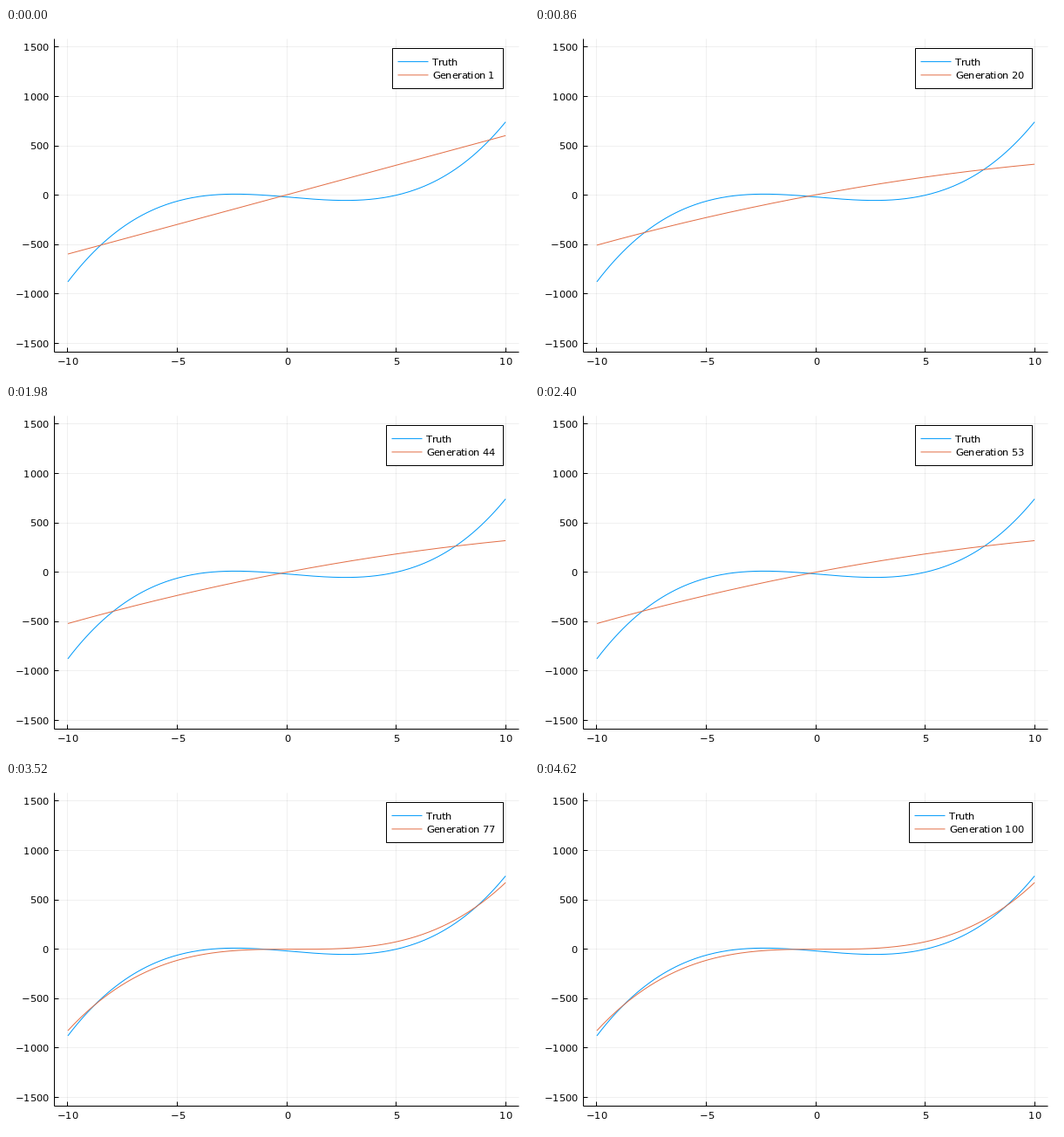
These frames come from a looping animation (600 px wide and 400 px high, 4.64 s). A matplotlib script:

```python
import math

import numpy as np
import matplotlib.pyplot as plt
from matplotlib.animation import FuncAnimation
from matplotlib.patches import Rectangle
from matplotlib.textpath import TextPath

W, H, DPI = 600, 400, 100
TICK_MS, LOOP_MS = 20, 4640
PX = 72 / DPI  # one pixel in points
EM = 11.5      # font size in pixels

LEFT, RIGHT, TOP, BOTTOM = 55.9, 588.2, 11.8, 371.5
X_MAX, Y_MAX = 10.6, 1590
BLUE, ORANGE = "#009afa", "#e36f47"

plt.rcParams["font.family"] = "DejaVu Sans"

fig = plt.figure(figsize=(W / DPI, H / DPI), dpi=DPI, facecolor="white")
ax = fig.add_axes([0, 0, 1, 1])
ax.set_xlim(0, W)
ax.set_ylim(H, 0)
ax.axis("off")


def px(x):
    return LEFT + (x + X_MAX) / (2 * X_MAX) * (RIGHT - LEFT)


def py(y):
    return BOTTOM - (y + Y_MAX) / (2 * Y_MAX) * (BOTTOM - TOP)


def line(xs, ys, color="black", z=3, **kw):
    return ax.plot(xs, ys, color=color, lw=PX, zorder=z,
                   solid_capstyle="butt", **kw)[0]


def ink_width(text):
    return TextPath((0, 0), text, size=EM).get_extents().width


def advance(char):
    """Whole-pixel pen advance of one character."""
    return math.floor(ink_width(f"|{char}|") - ink_width("||"))


ADVANCE = {c: advance(c) for c in set("TruthGeneration 0123456789\u2212")}


def text_width(text):
    return sum(ADVANCE[c] for c in text)


def make_glyphs(count, z=3):
    return [ax.text(0, 0, "", fontsize=EM * PX, va="baseline", zorder=z)
            for _ in range(count)]


def place(glyphs, pen, y, text):
    """Set text on whole pixels; unused glyphs stay empty."""
    for glyph, char in zip(glyphs, text.ljust(len(glyphs))):
        glyph.set_text(char.strip())
        glyph.set_position((pen, y))
        pen += ADVANCE[char]


def label(pen, y, text, z=3):
    glyphs = make_glyphs(len(text), z)
    place(glyphs, round(pen), round(y), text)
    return glyphs


def number(n):
    return str(n).replace("-", "\u2212")


# Grid, ticks and axes, all on whole pixels
x_axis, y_axis = math.floor(BOTTOM), math.floor(LEFT)
for v in range(-10, 11, 5):
    x, text = math.floor(px(v)), number(v)
    line([x, x], [TOP, BOTTOM], z=1, alpha=0.06)
    line([x, x], [x_axis, x_axis - 5])
    label(px(v) - text_width(text) / 2, 386, text)
for v in range(-1500, 1501, 500):
    y, text = math.floor(py(v)), number(v)
    line([LEFT, RIGHT], [y, y], z=1, alpha=0.06)
    line([y_axis, y_axis + 5], [y, y])
    label(48 - text_width(text), py(v) + 4.2, text)
line([y_axis, RIGHT], [x_axis, x_axis])
line([y_axis, y_axis], [TOP, x_axis])

# Curves, with polynomial coefficients from the highest power down
xs = np.linspace(-10, 10, 201)
TRUTH = [1, -0.5, -19, -17.5]
FITS = [  # (first generation, coefficients)
    (1, [60, 4]),
    (7, [49, -9]),
    (18, [-1, 41, 4]),
    (33, [-1, 42, 0]),
    (54, [0.75, -0.75, 0, 0]),
]

line(px(xs), py(np.polyval(TRUTH, xs)), BLUE)
fit = line(px(xs), py(0 * xs), ORANGE, z=4)

# Legend, which grows to the left with its text
BOX_RIGHT, BOX_TOP, BOX_BOTTOM = 570, 23, 69
TEXT_RIGHT = 560
box = Rectangle((443, BOX_TOP), 127, BOX_BOTTOM - BOX_TOP, fc="white",
                ec="black", lw=PX, zorder=5)
ax.add_patch(box)
keys = [line([], [], color, z=6, snap=False) for color in (BLUE, ORANGE)]
truth_text = make_glyphs(len("Truth"), 6)
fit_text = make_glyphs(len("Generation 100"), 6)


def generation(ms):
    """Generations last 20, 100 and 20 ms in turn."""
    rounds, rest = divmod(ms, 140)
    return 1 + 3 * rounds + (rest >= 20) + (rest >= 120)


def update(frame):
    gen = generation(frame * TICK_MS)
    coeffs = [c for start, c in FITS if start <= gen][-1]
    fit.set_ydata(py(np.polyval(coeffs, xs)))

    name = f"Generation {gen}"
    pen = TEXT_RIGHT - text_width(name)
    place(truth_text, pen, 43, "Truth")
    place(fit_text, pen, 58, name)

    left = pen - 46
    box.set_x(left)
    box.set_width(BOX_RIGHT - left)
    for key, y in zip(keys, (38.6, 53.9)):
        key.set_data([left + 6.5, left + 41.5], [y, y])
    return fit, box, *keys, *truth_text, *fit_text


anim = FuncAnimation(fig, update, frames=LOOP_MS // TICK_MS,
                     interval=TICK_MS, repeat=True, repeat_delay=0)
plt.show()
```
